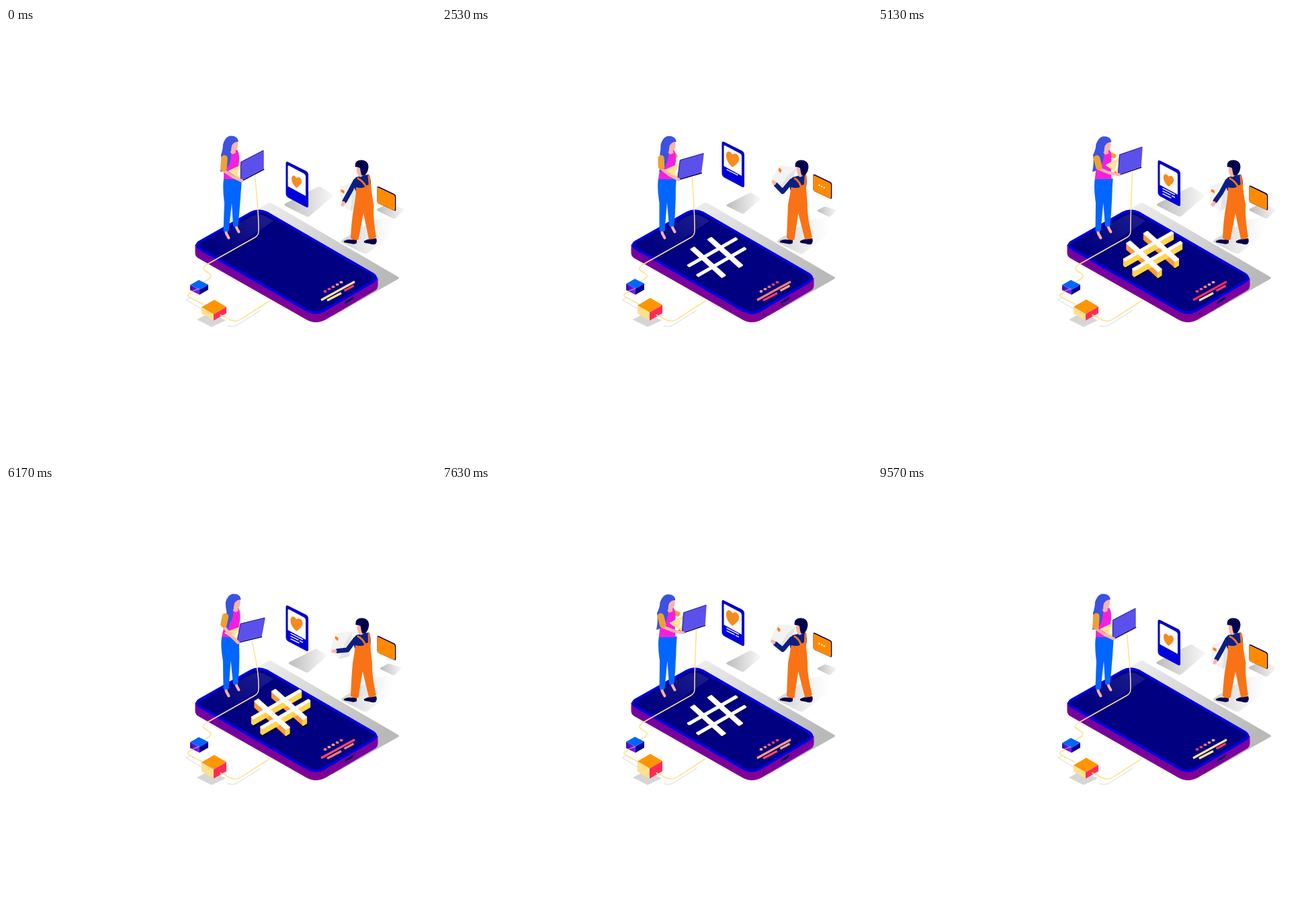
An HTML page for the animation above (9610 ms loop, 640 by 640 pixels).

```html
<!DOCTYPE html>
<html lang="en">
<head>
<meta charset="utf-8">
<title>Isometric phone</title>
<style>
html, body { margin: 0; width: 100%; height: 100%; overflow: hidden; background: #fff; }
svg { display: block; width: 100vw; height: 100vh; }
.wire { fill: none; stroke: #ffe08e; stroke-width: 1.5; stroke-linecap: round; }
.faint { fill: none; stroke: #d9d9d9; stroke-width: 1; }
.limb { fill: none; stroke-linecap: round; stroke-linejoin: round; }
</style>
</head>
<body>
<svg viewBox="0 0 640 640">
  <defs>
    <linearGradient id="floor" gradientUnits="userSpaceOnUse" x1="385" y1="268" x2="545" y2="390">
      <stop offset="0" stop-color="#ececec"/><stop offset="1" stop-color="#b9b9b9"/>
    </linearGradient>
    <linearGradient id="shade"><stop offset="0" stop-color="#bcbcbc"/><stop offset="1" stop-color="#f9f9f9"/></linearGradient>
    <linearGradient id="manShade"><stop offset="0" stop-color="#d2d2d2"/><stop offset=".75" stop-color="#f8f8f8"/><stop offset="1" stop-color="#fff"/></linearGradient>
    <linearGradient id="edge"><stop offset="0" stop-color="#7500a0"/><stop offset=".7" stop-color="#820092"/><stop offset="1" stop-color="#7a00a0"/></linearGradient>
    <linearGradient id="glass" gradientUnits="userSpaceOnUse" x1="365" y1="275" x2="320" y2="335">
      <stop offset="0" stop-color="#fff" stop-opacity=".1"/><stop offset="1" stop-color="#fff" stop-opacity="0"/>
    </linearGradient>
    <linearGradient id="violet"><stop offset="0" stop-color="#3a0cb0"/><stop offset="1" stop-color="#8b1cff"/></linearGradient>
  </defs>

  <path fill="url(#floor)" d="M375 270L389 261Q392 259 396 261L583 370Q587 372 583 374L486 429Z"/>
  <path fill="url(#manShade)" d="M501 315L547 286L578 280L573 309L538 335Q535 337 531 335L501 320Q497 318 501 315Z"/>
  <path id="cardShade" fill="url(#shade)" d="M416 261L463 237Q466 235 469 237L488 249L452 280Q449 282 446 280L416 265Q413 263 416 261Z"/>
  <path id="chatShade" fill="url(#shade)" d="M553 269L565 263Q568 261 571 262L594 270L580 283Q578 284 575 283L553 272Q551 271 553 269Z"/>

  <path fill="url(#edge)" d="M281.500 322V334Q281.500 340 286 342.500L447 434Q461 442 476 434L549 391Q553.500 388 553.500 383V372Z"/>
  <path fill="#000080" stroke="#0000dc" stroke-width="4" d="M287 319L365 275Q376 269.500 388 275L547 367Q553.500 372 547 377L474 420Q461 427.500 448 420L288 328Q281.500 323.500 287 319Z"/>
  <path fill="url(#glass)" d="M296 319L366 280Q376 275 386 280L398 287L327 336Z"/>
  <path class="limb" stroke="#1a0058" stroke-width="5" d="M507 409L516 403"/>
  <path class="limb" stroke="#9a28c8" stroke-width="1" d="M506 411L516 405.500L518 402"/>
  <ellipse cx="478.500" cy="425.500" rx="1.500" ry="2" fill="#25005c"/>
  <g id="panelDots"></g>
  <g id="panelBars" fill="none" stroke-width="3.200">
    <path d="M469 405L519 377.500"/><path d="M478 405.500L499 394.500"/><path d="M503.500 391L517.500 383.500"/>
  </g>
  <g id="hash"></g>

  <path fill="#d6d6d6" d="M284 434L302 424L327 435L306 445Z"/>
  <path class="faint" d="M275 401L268 404.500L291 418M330 443Q339 446 346 441L379 420"/>
  <path class="wire" d="M282 391L273 395Q268 398 274 401L293 411"/>
  <path class="wire" id="cord"/>
  <g id="blueBox"></g>
  <path class="wire" d="M277 392L287 388" stroke-opacity=".5"/>
  <g id="warmBox"></g>
  <path class="wire" d="M319 427L333 434Q342 439 352 432L392 406"/>

  <g id="card">
    <path fill="#0000dc" d="M416.500 202Q416.500 197.500 420 199.500L447 213Q450 215 450 219V264Q450 268.500 446.500 266.500L420 252.500Q416.500 250 416.500 246Z"/>
    <path fill="none" stroke="#00007c" d="M418 200L446 214Q449.500 216 449.500 220V265"/>
    <path fill="#fff" d="M419.500 206Q419.500 204 421.500 205L444 217Q446 218.500 446 221V250L419.500 235.500Z"/>
    <g id="lines" fill="none" stroke="#fff" stroke-width="1.300">
      <path pathLength="1" d="M423.500 240.500L442 250"/>
      <path pathLength="1" d="M423.500 244.500L435.500 250.500M437 251.500L442 254"/>
      <path pathLength="1" d="M423.500 248.500L436.500 255"/>
    </g>
  </g>
  <path id="heart" fill="#f68b1f" d="M0 9.500C-3 7 -7.500 2 -7.500 -4C-7.500 -9.500 -3 -10.500 0 -5C3 -8 7.500 -5 7.500 0C7.500 4 3 7 0 9.500Z"/>

  <g id="chat">
    <path fill="#00006c" d="M552.500 237.500Q552.500 235 555 236L578 247Q580.300 248.200 580.300 251V270.500Q580.300 273 578 272L555 261.500Q552.500 260.500 552.500 258Z"/>
    <path fill="#ff8a00" d="M552.500 238.800Q552.500 236.500 554.500 237.500L577 248.300Q579 249.300 579 251.500V270Q579 272.300 577 271.500L555 261.500Q552.500 260.500 552.500 258Z"/>
    <g id="dots" fill="#fff"></g>
  </g>

  <g id="woman">
    <path class="limb" stroke="#ffb3a8" stroke-width="4" d="M327 301L328 306L331.500 312.500M342 294L343.500 298L346.500 303.500"/>
    <path id="backArm" class="limb" stroke="#f0a132" stroke-width="7"/>
    <path id="jeans" fill="#0066ff"/>
    <path id="top" fill="#f520dc"/>
    <path id="hair" fill="#3c52e2"/>
    <g id="face">
      <path fill="#ffb3a8" d="M335 180H341L342 186L337 188L334 185Z"/>
      <path fill="#ffb3a8" d="M335 170L344.500 167.500Q346 175 343.500 180Q341 184 337 181Q334 177 335 170Z"/>
      <path fill="#3c52e2" d="M323 176Q325 161 335 160.500Q345 160.500 346 169Q339 169 336 175L335 183L328 190Z"/>
    </g>
    <path id="base" fill="#ffe293" stroke="#ffe293"/>
    <path id="keys" fill="none" stroke="#fff" stroke-width="3"/>
    <path id="hinge" class="limb" stroke="#00006c" stroke-width="1.800"/>
    <path id="screen" fill="#5b50ea" stroke="#5b50ea" stroke-width="1.500" stroke-linejoin="round"/>
    <path id="rim" class="limb" stroke="#1b1b9c" stroke-width="1"/>
    <path id="forearm" class="limb" stroke="#ffb3a8" stroke-width="4.500"/>
    <path id="sleeve" class="limb" stroke="#f0a132" stroke-width="9.500"/>
  </g>

  <g id="man">
    <path fill="#00004e" d="M503 317Q508 314 514 315L522 315V320Q519 322.500 514 321L505 319.500Q502 319 503 317ZM533 317Q538 314 543 314L551 313Q553 318 550 321.500Q546 323 541 321L535 320Q532 319 533 317Z"/>
    <g id="box">
      <path fill="#e4e4e4" d="M-4 -26L20 -36L25 1L12 9L-4 -1Z"/>
      <path fill="#f3f3f3" d="M-4 -26L20 -36L14 -18L12 9L-4 -1Z"/>
      <path fill="#ff7a1a" d="M-2.500 -23L2.500 -21V-16.500L-2.500 -19Z"/>
    </g>
    <path id="shirt" fill="#0b1f84"/>
    <path id="overalls" fill="#f97316"/>
    <path id="straps" class="limb" stroke="#f97316" stroke-width="3"/>
    <path id="arm" class="limb" stroke="#0b1f84" stroke-width="7"/>
    <path id="hand" class="limb" stroke="#ffb3a8" stroke-width="5"/>
    <g id="manHead">
      <path fill="#ffb3a8" d="M522 207L531 206V220Q526 224 524 219Q521 213 522 207Z"/>
      <path fill="#00004e" d="M520 207Q518 197 529 196.500Q539 197 539.500 206Q539.500 213 534.500 219L529.500 219.500L528 215L527 208.500Q523 206 520 207Z"/>
    </g>
  </g>
</svg>
<script>
const LOOP = 9610, HALF = LOOP / 2, TAU = 2 * Math.PI;
const $ = id => document.getElementById(id);
const draw = (id, d) => $(id).setAttribute('d', d);
const place = (id, transform) => $(id).setAttribute('transform', transform);
const move = (id, x, y) => place(id, `translate(${x} ${y})`);
const shrink = (id, x, y, k) => place(id, `translate(${x} ${y}) scale(${k}) translate(${-x} ${-y})`);
const clamp = x => Math.min(1, Math.max(0, x));
const smooth = x => (x = clamp(x), x * x * (3 - 2 * x));
const mix = (a, b, k) => a + (b - a) * k;
const span = (t, a, b) => smooth((t - a) / (b - a));
const pulse = (t, a, b, c, d) => span(t, a, b) - span(t, c, d);
const wave = x => Math.cos(TAU * x);
const add = (p, x, y) => [p[0] + x, p[1] + y];
const toward = (a, b, k) => [mix(a[0], b[0], k), mix(a[1], b[1], k)];
const line = (...pts) => 'M' + pts.map(p => p.join(' ')).join('L');
const poly = pts => line(...pts) + 'Z';
const shape = (d, color, w) =>
  `<path d="${d}" fill="${color}" stroke="${color}" stroke-width="${w}" stroke-linejoin="round"/>`;
const repeat = (n, make) => Array.from({ length: n }, (_, i) => make(i)).join('');
const each = (id, fn) => [...$(id).children].forEach(fn);

$('panelDots').innerHTML = repeat(5, i => `<ellipse cx="${475 + 6 * i}" cy="${392 - 3.4 * i}" rx="2.500" ry="1.900"/>`);
$('dots').innerHTML = repeat(3, i => `<circle cx="${561.5 + 3.7 * i}" cy="${252 + 1.9 * i}"/>`);

// cream at 0, red at 1
const warm = k => `rgb(255,${Math.round(mix(226, 42, k))},${Math.round(mix(142, 88, k))})`;

function panel(t, u) {
  const beat = u / HALF;
  each('panelDots', (el, i) => el.setAttribute('fill', warm(.62 + .3 * wave(beat + i / 8))));
  const bars = [.5 - .5 * wave(t / LOOP), .45 - .45 * wave(beat), .6 + .3 * wave(beat)];
  each('panelBars', (el, i) => el.setAttribute('stroke', warm(bars[i])));
}

// box that keeps its floor and grows upward
function crate(id, L, M, R, depth, rise, top, left, right) {
  const [l, m, r] = [L, M, R].map(p => add(p, 0, -rise));
  const h = depth + rise, back = [l[0] + r[0] - m[0], l[1] + r[1] - m[1]];
  const face = (a, b, c) => shape(poly([a, b, add(b, 0, h), add(a, 0, h)]), c, 0);
  $(id).innerHTML = face(l, m, left) + face(m, r, right) + shape(poly([l, back, r, m]), top, 0);
}

const strokeBar = { w: [2.5, -1.5], wide: 2.2 }, crossBar = { w: [1, .9], wide: 2.4 };
const BARS = [
  { ...strokeBar, p: [373, 328], q: [419, 369.5] },
  { ...strokeBar, p: [398.5, 313.5], q: [444.5, 354.5] },
  { ...crossBar, p: [438, 313.5], q: [367, 354] },
  { ...crossBar, p: [451, 328], q: [380.5, 368.5] }
];

function hash(t) {
  const h = 9 * pulse(t, 2600, 4600, 6300, 7680);
  let base = '', sides = '', tops = '';
  BARS.forEach(({ p, q, w: [x, y], wide }, i) => {
    const on = 300 + 450 * i, off = 8900 - 400 * i;
    const grow = pulse(t, on, on + 580, off, off + 550);
    if (grow < .005) return;
    const a = add(p, 0, -h), b = add(toward(p, q, grow), 0, -h);
    const a1 = add(a, x, y), a2 = add(a, -x, -y), b1 = add(b, x, y), b2 = add(b, -x, -y);
    const wall = (m, n, c) => shape(poly([m, n, add(n, 0, h), add(m, 0, h)]), c, wide);
    const quad = [a1, b1, b2, a2];
    if (h > .02) {
      base += shape(poly(quad.map(v => add(v, .8, h + 1.8))), '#00001c', wide);
      sides += (y < 0 ? wall(a2, b2, '#ff9c38') : wall(a1, b1, '#ffd650')) + wall(b2, b1, '#ffd04c');
    }
    tops += shape(poly(quad), '#fff', wide);
  });
  $('hash').innerHTML = `<g opacity="${clamp(h * 8)}">${base}</g>` + sides + tops;
}

function woman(t) {
  const low = pulse(t, 0, 1400, 1550, 3500) + pulse(t, 5130, 6050, 6250, 7600);
  const high = pulse(t, 1550, 3500, 5130, 6050) + pulse(t, 6250, 7600, 7700, 9570);
  const hip = -3 * low - 1.3 * high, hx = 3.8 * low + 1.5 * high, hy = .7 * high, s = hx * .4;
  const tip = 319 + 8.5 * low;

  const B = [350 - 5.5 * low + 8 * high, 226 + 5.5 * low - 9 * high];
  const A = add(B, 5 * low + 2 * high, -26 - 2 * high);
  const across = [33 + 2.5 * low, -17 + 8.5 * low + 6 * high];
  const C = add(A, ...across), D = add(B, ...across), mid = toward(B, D, .5);
  const elbow = [324 + 4.7 * high, 209 - 3 * low - 2.5 * high];

  draw('jeans', `M${324 + hip} 225Q${322 + hip} 238 ${325 + hip * .7} 260L323.500 302Q328 304 331.500 302L${336 + hip * .5} 260L338 295Q342 297 345.500 294Q348 268 ${350 + hip} 238L${351 + hip} 224Z`);
  draw('top', `M${327 + s} 188L${336 + s} 185L${344 + s} 181Q${349 + s} 190 ${346 + s} 205L${349 + hip} 225H${324 + hip}Q${324 + s} 205 ${327 + s} 188Z`);
  draw('hair', `M${325 + hx} ${168 + hy}L${334 + hx} ${180 + hy}Q${337 + hx} 192 ${331 + s} 206L${tip + 4} 213L${tip} 214Q${tip + 3} 200 ${tip + 1} 189Q${323 + hx} 180 ${323 + hx} 173Z`);
  move('face', hx, hy);
  draw('backArm', line([343 + s, 187], [343 + 8 * high, 190.5]));
  draw('base', poly([add(A, 0, 4), B, add(B, -19, -13)]));
  draw('keys', line(add(A, -3, 11), add(B, -4, -6)));
  draw('hinge', line(add(B, -5, -2), add(B, 1, 1.5), add(D, .5, 1.5)));
  draw('screen', poly([A, C, D, B]));
  draw('rim', line(add(B, -.5, 0), add(A, -.5, -.5), add(C, 0, -.8)));
  draw('cord', `M${mid[0] + 4} ${mid[1] + 4}Q376 275 376 296V302Q376 309 370 312L299 352Q290 358 297 362L302 365Q308 369 303 373L294 378`);
  draw('forearm', line(add(elbow, 0, 3), toward(add(elbow, 0, 7), B, .5), add(B, 1, 1.5)));
  draw('sleeve', line([325 + s, 194], elbow));
}

function man(lift) {
  const swing = lift * lift;
  const hip = -3.5 * lift, waist = hip * .4, head = 6 * swing ** 3, s = head * .2;
  const elbow = [511 - 4 * lift, 245 - 1.5 * lift];
  const hand = [501 - 8 * lift ** .4 - 7 * Math.sin(Math.PI * swing), 263 - 34 * swing];

  place('box', `translate(${hand}) rotate(${30 * swing})`);
  draw('shirt', `M${521 + s} 222Q532 219 ${540 + s} 218Q544 225 ${543 + waist} 240L${520 + waist} 242L516 228Z`);
  draw('overalls', `M${521 + waist} 237Q532 240 ${537 + waist} 234L${543 + waist} 232Q${544 + waist} 248 ${547.5 + hip} 263Q${546 + hip * .7} 283 551 311Q546 316 540 314L${532 + hip * .5} 276L524.500 315Q518 317 513 313Q514 285 ${518.5 + hip} 263Q${521 + hip} 250 ${521 + waist} 237Z`);
  draw('straps', `M${524 + s} 224Q532 228 ${536 + waist} 237M${540 + s} 220L${541.5 + waist} 236`);
  draw('arm', line([520, 228], elbow, toward(elbow, hand, .68)));
  draw('hand', line(toward(elbow, hand, .86), hand));
  move('manHead', head, 0);
}

function render(t) {
  const u = t % HALF;
  const lift = pulse(u, 0, 2130, 2600, 4730);
  move('card', 0, -30 * lift);
  place('heart', `translate(432.500 ${228.5 - 33.5 * lift}) scale(${1 + .3 * lift})`);
  move('chat', 0, -18 * lift);
  shrink('cardShade', 444, 266, 1 - .3 * lift);
  shrink('chatShade', 574, 275, 1 - .3 * lift);

  each('dots', (el, i) => {
    const on = 1900 - 320 * i;
    el.setAttribute('r', 1.2 * pulse(u, on, on + 400, 4100, 4500));
  });
  each('lines', (el, i) => {
    const on = 2000 + 850 * i, off = 8300 - 750 * i;
    const grown = pulse(t, on, on + 650, off, off + 650);
    el.setAttribute('stroke-dasharray', `${grown} 2`);
    el.setAttribute('visibility', grown > .01 ? 'visible' : 'hidden');
  });

  panel(t, u);
  crate('blueBox', [274, 382.5], [288, 389.5], [301, 382], 7.5, 1.8 * lift, '#0066ff', 'url(#violet)', '#00008c');
  crate('warmBox', [291, 415.5], [309, 426], [328, 415], 9.5, (t < HALF ? 2.8 : 6) * lift, '#ff9500', '#ffe08e', '#ff2b5a');
  hash(t);
  woman(t);
  man(lift);
}

const start = performance.now();
function tick(now) {
  render(Math.max(0, now - start) % LOOP);
  requestAnimationFrame(tick);
}
render(0);
requestAnimationFrame(tick);
</script>
</body>
</html>
```
